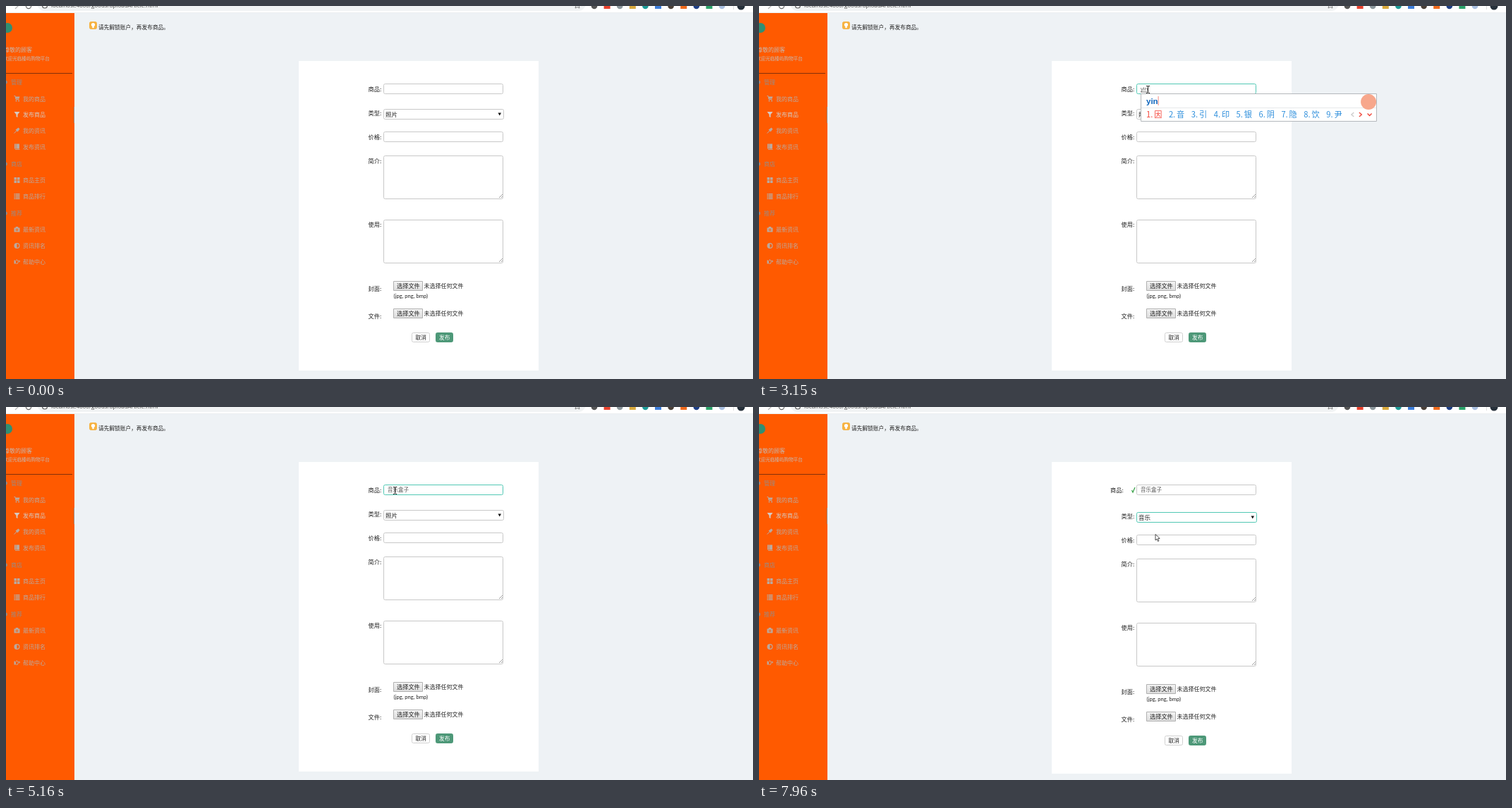
An HTML page with a canvas for the animation above (8000 ms loop, 1059x529 px).

```html
<!DOCTYPE html>
<html lang="zh">
<head>
<meta charset="utf-8">
<title>发布商品</title>
<style>
html, body { margin: 0; width: 100%; height: 100%; overflow: hidden; background: #eef2f5; }
canvas { display: block; }
</style>
</head>
<body>
<canvas id="stage" width="1059" height="529"></canvas>
<script>
const LOOP = 8000;
const g = document.getElementById('stage').getContext('2d');
const CJK = '"Noto Sans CJK SC", "Noto Sans CJK", sans-serif';
const LATIN = '"Open Sans", "Noto Sans", sans-serif';
const ARIAL = '"Liberation Sans", sans-serif';
const GREY = [200, 200, 200], TEAL = [82, 200, 180];
const LINE = '#c8c8c8', ORANGE = '#ff5a00';

// y is the vertical centre of the glyphs
function text(s, x, y, size = 8, color = '#222', family = CJK, weight = '') {
  g.font = `${weight} ${size}px ${family}`;
  g.fillStyle = color;
  g.fillText(s, x, y + size * 0.37);
  return g.measureText(s).width;
}

function rect(x, y, w, h, color) {
  g.fillStyle = color;
  g.fillRect(x, y, w, h);
}

function disc(x, y, r, color) {
  g.fillStyle = color;
  g.beginPath();
  g.arc(x, y, r, 0, 7);
  g.fill();
}

function poly(points, fill, stroke, width = 1) {
  g.beginPath();
  for (let i = 0; i < points.length; i += 2) g.lineTo(points[i], points[i + 1]);
  if (fill) { g.closePath(); g.fillStyle = fill; g.fill(); }
  if (stroke) { g.strokeStyle = stroke; g.lineWidth = width; g.stroke(); }
}

function box(x, y, w, h, fill, stroke = fill, r = 2) {
  g.beginPath();
  g.roundRect(x + 0.5, y + 0.5, w - 1, h - 1, r);
  g.fillStyle = fill;
  g.fill();
  g.strokeStyle = stroke;
  g.lineWidth = 1;
  g.stroke();
}

const clamp = v => Math.max(0, Math.min(1, v));
const mix = (a, b, k) => `rgb(${a.map((v, i) => Math.round(v + (b[i] - v) * k))})`;
const ramp = (t, from, to) => clamp((t - from) / (to - from));
const latest = (list, t) => list.filter(e => e[0] <= t).pop();

function drawBrowserBar() {
  rect(0, 0, 1059, 10, '#fff');
  box(44, -14, 778, 21, '#f1f3f4', '#f1f3f4', 10);
  rect(0, 9, 1059, 1, '#eceef0');
  poly([13, 4, 18, -1], null, '#b5b5b5', 1.2);
  g.strokeStyle = '#666';
  g.lineWidth = 1.2;
  g.beginPath(); g.arc(32, 0, 3.6, 0, Math.PI); g.stroke();
  g.beginPath(); g.arc(55, -0.5, 3.5, 0, 7); g.stroke();
  text('localhost:4000/goods/uploadArticle.html', 64, -0.5, 8, '#444', LATIN);
  poly([807, 3, 808, -1, 812, -1, 813, 3, 810, 1.5, 807, 3], null, '#666', 0.8);
  const marks = ['#555', '#e8402c', '#8c979c', '#d9a93c', '#1b9a96', '#3c7edb',
    '#4a4038', '#f06a1c', '#1e3f86', '#2ba36a', '#a9bfe0'];
  marks.forEach((c, i) => {
    const x = 834 + i * 18.1;
    if (i % 2) rect(x - 4.5, -5, 9, 9, c);
    else disc(x, 0, 4.3, c);
  });
  rect(1031, 0, 1, 5, '#ddd');
  disc(1042, 0, 5.5, '#26303a');
}

const icons = {
  cart(c) {
    poly([-4, -4, -2.5, -4, -1.5, 1, 3, 1], null, c, 1);
    poly([-2.3, -3, 4, -3, 3, 0, -1.7, 0], c);
    disc(-1, 3, 1, c); disc(2.6, 3, 1, c);
  },
  funnel(c) { poly([-4, -4, 4, -4, 1, 0, 1, 4, -1, 3, -1, 0], c); },
  pin(c) {
    poly([-4, 4, 0, 0], null, c, 1);
    poly([-2, -1, 2, -4, 4, -2, 1, 2], c);
  },
  book(c) { rect(-3.5, -4, 7, 7, c); rect(-2.5, 3.5, 6.5, 0.8, c); rect(-1.8, -4, 0.6, 7, ORANGE); },
  grid(c) { for (const x of [-4, 0.4]) for (const y of [-4, 0.4]) rect(x, y, 3.6, 3.6, c); },
  list(c) { for (const y of [-3.5, -1.3, 0.9, 3.1]) { rect(-4, y, 1.4, 1.4, c); rect(-2, y, 6, 1.4, c); } },
  camera(c) { rect(-4, -2.5, 8, 6, c); rect(-1.8, -4, 3.6, 2, c); disc(0, 0.5, 1.7, ORANGE); disc(0, 0.5, 0.9, c); },
  half(c) {
    disc(0, 0, 4, c);
    g.fillStyle = ORANGE;
    g.beginPath(); g.arc(0, 0, 2.8, -Math.PI / 2, Math.PI / 2); g.fill();
  },
  hand(c) {
    rect(-4, -2, 1.5, 5, c);
    poly([-2, 2.5, -2, -1, 0, -3, 0.5, -1.2, 4, -1.2, 4, 0.2, 1.5, 0.4, 1, 2.8, -2, 2.8], null, c, 0.9);
  }
};

function drawSidebar() {
  rect(0, 10, 97, 519, ORANGE);
  disc(2, 31, 7, '#2f8f73');
  text('尊敬的顾客', -3, 62, 8, '#c6b8b0');
  text('欢迎光临榛屿购物平台', -4, 75, 6.6, '#c6b8b0');
  rect(0, 95, 94, 1, '#85300a');
  rect(96, 143, 1, 23, '#a58474');
  [['管理', 108], ['商店', 224], ['推荐', 294]].forEach(([s, y]) => {
    text(s, 7, y, 8, '#9a8a82');
    disc(-0.5, y, 2.5, '#9a8a82');
  });
  const items = [['cart', '我的商品', 132], ['funnel', '发布商品', 154.5], ['pin', '我的资讯', 177],
    ['book', '发布资讯', 200], ['grid', '商品主页', 247.5], ['list', '商品排行', 270],
    ['camera', '最新资讯', 317.5], ['half', '资讯排名', 340.5], ['hand', '帮助中心', 363]];
  items.forEach(([icon, s, y], i) => {
    const color = i === 1 ? '#d6c9c2' : '#bba99f';
    g.save();
    g.translate(15.5, y - 0.5);
    icons[icon](color);
    g.restore();
    text(s, 24, y, 8, color);
  });
}

function drawNotice() {
  box(118, 22, 11, 11, '#f6b343');
  disc(123.5, 26.5, 2.6, '#fff');
  rect(122.3, 29, 2.4, 2.2, '#fff');
  text('请先解锁账户，再发布商品。', 131, 30, 7.7);
}

function textarea(y) {
  box(535, y, 170, 62, '#fff', LINE);
  poly([699, y + 60, 704, y + 55], null, '#888', 0.8);
  poly([702, y + 60, 704, y + 58], null, '#888', 0.8);
}

function fileRow(y) {
  const shade = g.createLinearGradient(0, y, 0, y + 14);
  shade.addColorStop(0, '#f5f5f5');
  shade.addColorStop(1, '#dcdcdc');
  box(549, y, 42, 14, shade, '#b0b0b0', 0);
  text('选择文件', 554, y + 7, 8.2);
  text('未选择任何文件', 592.5, y + 7, 8);
}

// [time, committed text, letters being composed]
const typing = [
  [0, '', ''], [2990, '', 'y'], [3070, '', 'yi'], [3150, '', 'yin'],
  [3460, '', "yin'y"], [3540, '', "yin'yu"], [3610, '', "yin'yue"], [3920, '音乐', ''],
  [4150, '音乐', 'h'], [4220, '音乐', 'he'], [4610, '音乐', "he'z"],
  [4930, '音乐', "he'zi"], [5160, '音乐盒子', '']
];
const candidates = {
  y: '一 有 要 也 又 用 与 以 由',
  yi: '一 以 已 亿 意 易 义 依 移',
  yin: '因 音 引 印 银 阴 隐 饮 尹',
  "yin'y": '音乐 引用 因由 隐约 饮用 阴影 音译 银元 引言',
  "yin'yu": '音域 因于 阴雨 银鱼 隐喻 饮誉 引语 音语 印玉',
  "yin'yue": '音乐 隐约 银月 音悦 殷悦 隐月 殷乐 尹月 阴月',
  h: '和 会 好 还 很 后 或 话 化',
  he: '和 合 喝 何 河 合适 合作 核 和谐',
  "he'z": '合作 合资 盒子 合照 合作社 何止 合作者 合作方 盒装',
  "he'zi": '盒子 核子 合资 合子 何自 河子 荷子 贺子 和子'
};

function drawInputMethod(left, letters) {
  const words = candidates[letters].split(' '), size = 11.2, gap = 9.5;
  const width = words.reduce((w, s) => w + (s.length + 1) * size + gap, 8 - gap);
  const right = left + width + 49;
  box(left, 124, Math.round(right - left), 40, '#fff', '#b4b8bc', 0);
  rect(left + 1, 144, right - left - 2, 1, '#e6e8ea');
  const end = left + 8 + text(letters, left + 8, 135, 11.5, '#0f66bd', ARIAL, 'bold');
  rect(end, 128, 1, 13, '#f58a80');
  let x = left + 8;
  words.forEach((s, i) => {
    const color = i ? '#2f8fdc' : '#f5443a';
    text(i + 1 + '.', x, 153.5, size, color, CJK, 300);
    text(s, x + size, 153.5, size, color, CJK, 300);
    x += (s.length + 1) * size + gap;
  });
  const chevron = (cx, dx, color) =>
    poly([cx - dx, 151, cx + dx, 154, cx - dx, 157], null, color, 1.4);
  chevron(right - 34, -1.7, '#ccc');
  chevron(right - 23, 1.7, '#f0483c');
  poly([right - 13, 152.5, right - 10, 155.5, right - 7, 152.5], null, '#f0483c', 1.4);
  disc(right - 11.5, 136, 11, '#f7a78c');
}

function drawAutofill() {
  g.save();
  g.shadowColor = 'rgba(0,0,0,.4)';
  g.shadowBlur = 3;
  g.shadowOffsetY = 1;
  rect(535, 125, 170.5, 70, '#fff');
  g.restore();
  ['tulolostudio', 'yuntanghe', '10000000000'].forEach((s, i) =>
    text(s, 541.5, 140 + i * 20.4, 7.5, '#222', LATIN));
}

function drawOptions(active) {
  box(535, 163, 171, 74, '#fff', '#9a9a9a', 0);
  ['照片', '音乐', '视频', '文档', '软件', '其他'].forEach((s, i) => {
    if (i === active) rect(536, 164 + i * 12, 169, 12, '#1e90ff');
    text(s, 538, 170 + i * 12, 8.5, i === active ? '#fff' : '#222');
  });
}

function caretOn(t) {
  if (t < 970 || t >= 7030) return false;
  const since = t < 1140 ? 970 : t < 2990 ? 1140 : t < 5160 ? t : 5180;
  return Math.floor((t - since) / 531) % 2 === 0;
}

function drawForm(t) {
  const blurred = t >= 7030, dy = blurred ? 3 : 0;
  const tick = Math.floor(t / 78) * 78;
  const selectFocus = ramp(tick, 7000, 7210);
  const focus = ramp(tick, 930, 1360) - selectFocus;
  rect(415, 78, 340, 439 + dy, '#fff');

  text('商品:', blurred ? 498 : 513.5, 118, 8.2);
  if (blurred) poly([528.5, 118, 530, 121, 533, 114], null, '#35a045', 1.2);
  box(535, 110, 170, 15, '#fff', mix(GREY, TEAL, focus));
  const [, done, letters] = latest(typing, t);
  const doneWidth = text(done, 541, 117.5, 7.5, '#555');
  const raw = letters.replace("'", '');
  const rawWidth = text(raw, 541 + doneWidth, 117.5, 7.5, '#555', LATIN);
  if (raw) rect(541 + doneWidth, 121.5, rawWidth, 0.8, '#555');
  if (caretOn(t)) rect(541 + Math.round(doneWidth + rawWidth - 0.3), 113, 1, 9, '#666');

  g.save();
  g.translate(0, dy);
  [['类型:', 152], ['价格:', 186], ['简介:', 219.5], ['使用:', 310], ['封面:', 401], ['文件:', 440]]
    .forEach(([s, y]) => text(s, 513.5, y, 8.2));
  box(535, 146, 171, 15, '#fff', mix(GREY, TEAL, selectFocus));
  text(t < 7890 ? '照片' : '音乐', 538, 153.5, 8.5);
  poly([697.5, 151.5, 702, 151.5, 699.75, 155.5], '#111');
  box(535, 178, 170, 15, '#fff', LINE);
  textarea(212);
  textarea(303);
  fileRow(390);
  text('(jpg, png, bmp)', 549.5, 411, 7.6, '#222', 'Lato, sans-serif');
  fileRow(429);
  box(575, 463, 26, 14, '#fff', '#d0d0d0');
  text('取消', 580.5, 470, 7.7);
  box(609, 463, 25, 14, '#4d9878');
  text('发布', 614, 470, 7.7, '#fff');
  g.restore();

  if (t >= 1140 && t < 2990) drawAutofill();
  if (letters) drawInputMethod(done ? 558 : 541, letters);
  if (t >= 7110 && t < 7890) drawOptions(t < 7270 ? 0 : t < 7340 ? 1 : t < 7730 ? 2 : 1);
}

const moves = [
  [6410, 551, 119], [6480, 553, 122], [6560, 556, 129], [6640, 560, 137], [6720, 563, 144],
  [6790, 566, 150], [6870, 567, 152], [6950, 567, 154], [7030, 567, 155], [7270, 567, 177],
  [7340, 566, 190], [7570, 566, 192], [7730, 565, 186], [7810, 562, 180]
];

function pointer(t) {
  if (t < 110 || (t >= 5940 && t < 6410)) return null;
  if (t >= 6410) return latest(moves, t).slice(1);
  const k = clamp((Math.floor((t - 110) / 78) + 0.3) / 10);
  const e = k * k * (3 - 2 * k);
  return [Math.round(941 - 390 * e), Math.round(497 - 379 * e)];
}

function drawPointer(t) {
  const at = pointer(t);
  if (!at) return;
  const [x, y] = at;
  const inField = x > 535 && x < 705 &&
    [[110, 125], [178, 193], [212, 274], [303, 365]].some(([a, b]) => y > a && y < b);
  g.save();
  g.translate(x, y);
  if (inField && t < 7000) {
    rect(0, -4, 1, 9, '#222');
    for (const yy of [-5, 5]) { rect(-2, yy, 2, 1, '#222'); rect(1, yy, 2, 1, '#222'); }
  } else {
    poly([0, 0.5, 0, 9, 2, 7.2, 3.5, 10.5, 4.9, 9.9, 3.5, 6.7, 6.2, 6.5, 0, 0.5], '#fff', '#222', 0.8);
  }
  g.restore();
}

let start;
function frame(now) {
  start ??= now;
  const t = (now - start) % LOOP;
  rect(0, 0, 1059, 529, '#eef2f5');
  drawBrowserBar();
  drawSidebar();
  drawNotice();
  drawForm(t);
  drawPointer(t);
  requestAnimationFrame(frame);
}
requestAnimationFrame(frame);
</script>
</body>
</html>
```
